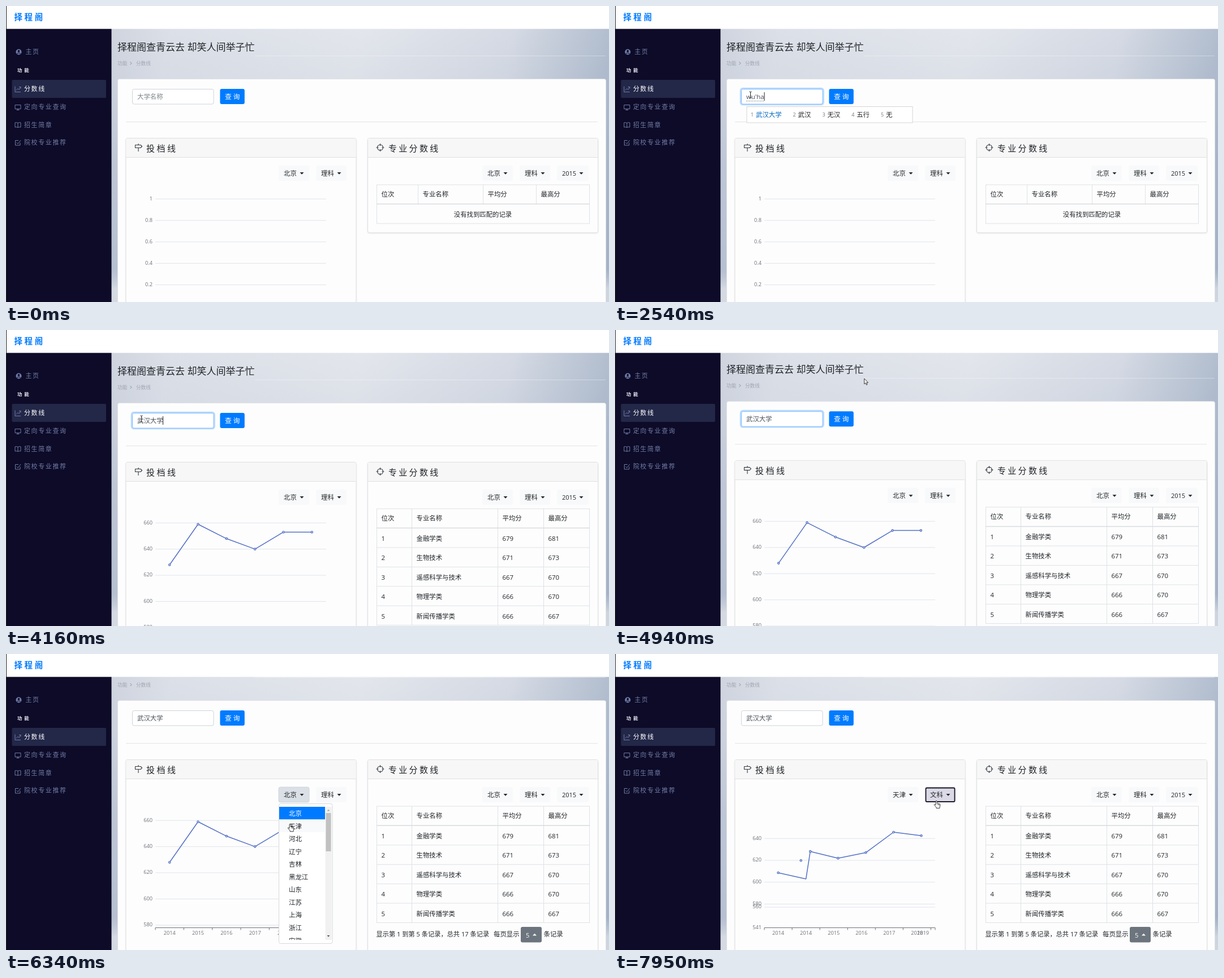
Recreate the animation shown at these times as an HTML page. Size 1066 by 525 pixels, loop 8000 ms.

```html
<!DOCTYPE html>
<html lang="zh-CN">
<head>
<meta charset="utf-8">
<title>分数线</title>
<style>
html, body { margin: 0; width: 100%; height: 100%; overflow: hidden; background: #fff; }
svg { display: block; width: 1066px; height: 525px; }
text { font-family: "Open Sans", "Noto Sans CJK SC", "Noto Sans CJK", sans-serif; white-space: pre; }
.soft { filter: drop-shadow(0 1px 1px rgba(0, 0, 0, .1)); }
.pop { filter: drop-shadow(0 1px 1.5px rgba(0, 0, 0, .24)); }
</style>
</head>
<body>
<svg viewBox="0 0 1066 525" xmlns="http://www.w3.org/2000/svg">
  <defs>
    <linearGradient id="sky" y2=".12">
      <stop offset="0" stop-color="#cfd4de"/>
      <stop offset=".12" stop-color="#dce0e8"/>
      <stop offset=".5" stop-color="#e3e6ec"/>
      <stop offset=".8" stop-color="#d5dae4"/>
      <stop offset="1" stop-color="#b0bccd"/>
    </linearGradient>
    <linearGradient id="haze" x2="0" y2="1">
      <stop offset="0" stop-color="#9dabc2" stop-opacity="0"/>
      <stop offset=".2" stop-color="#9dabc2" stop-opacity=".1"/>
      <stop offset=".5" stop-color="#9dabc2" stop-opacity=".42"/>
      <stop offset=".88" stop-color="#9dabc2" stop-opacity=".6"/>
      <stop offset=".95" stop-color="#d3d8e1" stop-opacity=".85"/>
      <stop offset="1" stop-color="#d3d8e1" stop-opacity=".9"/>
    </linearGradient>
    <clipPath id="listClip"><rect x="482" y="318" width="95" height="236"/></clipPath>
  </defs>
  <rect x="186" y="40" width="880" height="485" fill="url(#sky)"/>
  <rect x="186" y="40" width="880" height="485" fill="url(#haze)"/>
  <g id="page"></g>
  <g id="frame"></g>
  <g id="pointer"></g>
</svg>
<script>
const LOOP = 8000, TICK = 77.25, END = 47;
const BRAND = '择程阁';
const el = id => document.getElementById(id);
const lerp = (a, b, p) => a + (b - a) * p;
const clamp = v => Math.max(0, Math.min(1, v));
const cubic = u => u < .5 ? 4 * u ** 3 : 1 - (2 - 2 * u) ** 3 / 2;
const smooth = u => u * u * (3 - 2 * u);

// y is the vertical middle of the glyphs
const text = (x, y, s, size = 11.4, fill = '#212529', attr = '') =>
  `<text x="${x}" y="${(y + size * .37).toFixed(2)}" font-size="${size}" fill="${fill}" ${attr}>${s}</text>`;
const rect = (x, y, w, h, fill, attr = '') =>
  `<rect x="${x}" y="${y}" width="${w}" height="${h}" fill="${fill}" ${attr}/>`;
const line = (x1, y1, x2, y2, color, w = 1) =>
  `<path d="M${x1} ${y1}L${x2} ${y2}" stroke="${color}" stroke-width="${w}"/>`;
const icon = (x, y, d, color, w = 1) =>
  `<path transform="translate(${x} ${y})" d="${d}" fill="none" stroke="${color}" stroke-width="${w}" stroke-linejoin="round"/>`;
const spaced = n => `letter-spacing="${n}"`;

function chrome() {
  const dim = '#717ca9';
  const items = [
    ['分数线', 147, 'M0 -5V5H10M2 2L5 -1L7 1L10 -4M7 -4H10V-1'],
    ['定向专业查询', 179, 'M0 -4H10V3H0ZM5 3V5M2.5 5H7.5'],
    ['招生简章', 210.5, 'M5 -3.5V4.5M5 -3.5Q2.5 -5 0 -4V4Q2.5 3 5 4.5Q7.5 3 10 4V-4Q7.5 -5 5 -3.5'],
    ['院校专业推荐', 242, 'M9 0V4.5H.5V-4H6M2.5 -.5L5 2L10 -4.5']
  ];
  return rect(0, 40, 186.5, 485, '#0d0b27') + rect(0, 0, 1066, 40.6, '#fff') +
    rect(0, 0, 1, 525, '#222') +
    text(14.5, 20, BRAND, 14.5, '#007bff', 'font-weight="700" ' + spaced(3.6)) +
    `<circle cx="22.5" cy="81.5" r="5" fill="${dim}"/><circle cx="22.5" cy="80" r="1.9" fill="#0d0b27"/>` +
    icon(22.5, 81.5, 'M-3 3Q0 .5 3 3', '#0d0b27', 1.2) +
    text(34.5, 81, '主页', 11, dim, spaced(1.6)) +
    text(20, 113.5, '功能', 8.5, '#e8eaf4', 'font-weight="700" ' + spaced(3.8)) +
    rect(10.5, 131, 166.5, 32, '#232748', 'rx="2"') +
    items.map(([s, y, d], i) => icon(16, y + .5, d, dim) +
      text(32, y, s, 11, i ? dim : '#fff', (i ? '' : 'font-weight="500" ') + spaced(1.6))).join('');
}

function select(x, w, label, mode = '') {
  const fill = { hover: '#e6e9ef', open: '#dae0e5', focus: '#dad9e5' }[mode] || '#f8f9fa';
  const edge = mode === 'open' ? 'stroke="#d0d6dc"' : '';
  const cx = x + w - 13;
  return rect(x, 283, w, 27, fill, 'rx="3" ' + edge) +
    (mode === 'focus' ? rect(x + 1.5, 284.5, w - 3, 24.5, 'none', 'rx="2" stroke="#1c1b2c" stroke-width="1.8"') : '') +
    text(x + 9, 297, label, w > 55 ? 11 : 11.4) +
    `<path d="M${cx - 3.5} 295h7l-3.5 3.8z" fill="#212529"/>`;
}

function panel(x, h, title) {
  return rect(x + .5, 234.5, 407, h, '#fdfdfd', 'rx="3" stroke="#dfe0e2" class="soft"') +
    rect(x + 1, 235, 406, 33, '#f7f7f7', 'rx="2"') +
    line(x, 268.5, x + 407, 268.5, '#dfe0e2') + title;
}

function table(loaded) {
  const edge = '#dee2e6', cols = loaded ? [655, 717, 869, 950, 1031] : [655, 728, 843, 937, 1031];
  const rows = [['金融学类', 679, 681], ['生物技术', 671, 673], ['遥感科学与技术', 667, 670],
    ['物理学类', 666, 670], ['新闻传播学类', 666, 667]];
  const step = 34.4, n = loaded ? 5 : 1, bottom = 351.5 + step * n;
  let s = ['位次', '专业名称', '平均分', '最高分'].map((h, i) => text(cols[i] + 8.5, 334, h)).join('');
  cols.forEach((x, i) => {
    const inner = i % 4 !== 0;
    s += line(x + .5, 317, x + .5, loaded || !inner ? bottom : 351.5, edge);
  });
  s += line(655, 317, 1032, 317, edge) + line(655, 351.3, 1032, 351.3, '#d8dce0', 1.6);
  for (let i = 0; i < n; i++) {
    const y = 351.5 + step * (i + 1);
    s += line(655, y, 1032, y, edge);
    if (loaded) [i + 1, ...rows[i]].forEach((v, c) => s += text(cols[c] + 8.5, y - 16.2, v));
  }
  if (!loaded) return s + text(843, 370, '没有找到匹配的记录', 11.4, '#212529', 'text-anchor="middle"');
  return s + text(654.5, 544, '显示第 1 到第 5 条记录，总共 17 条记录', 11.2) + text(862, 544, '每页显示') +
    rect(910, 531, 37, 27.5, '#6c757d', 'rx="3"') + text(919, 545.5, '5', 11.2, '#fff') +
    '<path d="M931 546.5h7l-3.5 -3.8z" fill="#fff"/>' + text(950.5, 544, '条记录');
}

const years = [2014, 2015, 2016, 2017, 2018, 2019];
const EMPTY = { min: 0, max: 1, ticks: [0, .2, .4, .6, .8, 1], cats: [], vals: [] };
const BEIJING = { min: 578, max: 660, ticks: [580, 600, 620, 640, 660], cats: years, vals: [628, 659, 648, 640, 653, 653] };
const TIANJIN = { min: 562, max: 660, ticks: [562, 580, 600, 620, 640, 660], cats: years, vals: [612.6, 632, 626.5, 631.3, 649, 649] };
const ARTS = { min: 541, max: 640, ticks: [541, 560, 580, 600, 620, 640], cats: [2014, ...years], vals: [590, 603, 610, 600.5, 607, 630.5, 612] };
const yOf = (d, v) => 532.5 - (v - d.min) / (d.max - d.min) * 190.3;
const xOf = (d, i) => 264 + 302 / d.cats.length * (i + .5);

// keeps shared ticks and points moving, new ones appear in place
function chart(a, b, p) {
  let s = '';
  for (const v of b.ticks) {
    const y = a.ticks.includes(v) ? lerp(yOf(a, v), yOf(b, v), p) : yOf(b, v);
    if (v !== b.min) s += line(264, y, 566, y, '#e0e4ec');
    s += text(259, y - 1, v, 9.2, '#6e7079', 'text-anchor="end"');
  }
  const n = b.cats.length, old = a.cats.length, extra = n - old;
  if (!n) return s + line(264, 532.5, 566, 532.5, '#6e7079');
  let axis = 'M264 532.5H566';
  for (let i = 0; i <= n; i++) {
    const end = xOf(b, i - .5);
    axis += `M${i <= old ? lerp(xOf(a, i - .5), end, p) : end} 532.5v4`;
  }
  s += `<path d="${axis}" stroke="#6e7079" fill="none"/>`;
  b.cats.forEach((c, i) => {
    const x = i < old ? lerp(xOf(a, i), xOf(b, i), p) : xOf(b, i);
    s += text(x, 541.5, c, 9.2, '#6e7079', 'text-anchor="middle"');
  });
  const dots = [], pts = b.vals.map((v, i) => {
    const x = xOf(b, i), y = yOf(b, v), j = i ? i - extra : 0, fresh = extra && i === 1;
    const x0 = xOf(a, fresh ? i : j), y0 = yOf(a, fresh ? v : a.vals[j]);
    const pt = [lerp(x0, x, p), lerp(y0, y, p)];
    dots.push(fresh ? [x, y] : pt);
    return pt;
  });
  return s + `<polyline points="${pts.join(' ')}" fill="none" stroke="#5470c6" stroke-width="1.5" stroke-linejoin="bevel"/>` +
    dots.map(([x, y]) => `<circle cx="${x}" cy="${y}" r="1.6" fill="#fff" stroke="#5470c6" stroke-width="1.4"/>`).join('');
}

function chartAt(t, q) {
  if (t < 3860) return chart(EMPTY, EMPTY, 1);
  if (t < 6410) return chart(BEIJING, BEIJING, 1);
  if (t < 7790) return chart(BEIJING, TIANJIN, cubic(clamp((q - 6380) / 500)));
  return chart(TIANJIN, ARTS, cubic(clamp((q - 7775) / 500)));
}

const keys = [[1910, 'w'], [1990, 'wu'], [2390, "wu'h"], [2540, "wu'ha"], [2620, "wu'han"],
  [2700, "wu'han'd"], [2770, "wu'han'da"], [2850, "wu'han'da'x"], [3000, "wu'han'da'xue"]];

function searchBox(t) {
  const glow = t < 5560 ? clamp((t - 1120) / 150) : 0;
  let s = '';
  if (glow) s += rect(222, 146, 146.5, 29, 'none', `rx="4" stroke="#007bff" stroke-opacity="${.27 * glow}" stroke-width="2.6"`);
  s += rect(223.5, 147.5, 143.5, 26.5, '#fff', `rx="3" stroke="${glow > .5 ? '#80bdff' : '#ced4da'}"`);
  let caret = 233, on = t >= 1150;
  if (t < 1910) s += text(232, 161, '大学名称', 11.4, glow > .5 ? '#5b7be0' : '#7b838a');
  else if (t < 3080) {
    const typed = keys.filter(k => k[0] <= t).pop()[1];
    const w = [...typed].reduce((sum, c) => sum + (c === "'" ? 2.5 : c === 'w' ? 8.8 : 6.6), 0);
    s += text(232, 161, typed, 11.4, '#495057') +
      `<path d="M232 168.5h${w}" stroke="#495057" stroke-dasharray="1 1.5"/>`;
    caret = 233 + w;
  } else {
    s += text(232, 161, '武汉大学', 11.4, '#495057');
    caret = 277.5;
    on = t < 3630 || (t >= 4160 && t < 4690);
  }
  if (on) s += line(caret, 153, caret, 168, '#222', 1);
  return s;
}

function suggestions(t) {
  if (t >= 1300 && t < 1910)
    return rect(223, 173, 144.5, 63, '#fff', 'rx="3" class="pop"') + line(224, 173.5, 367, 173.5, '#e6e8ea') +
      text(232, 191, '武汉大学', 9.2) + text(232, 216.5, '中国石油大学（北京）', 9.2);
  if (t < 1910 || t >= 3080) return '';
  const wide = t >= 2540;
  const words = wide ? ['武汉大学', '武汉', '无汉', '五行', '无'] : t < 2390 ? ['我', '无', '五', '为', '问'] : ['武汉', '无', '五', '吴'];
  let x = 240, s = rect(233, 178.5, wide ? 293 : 203, 28.5, '#fff', 'stroke="#d5d5d5"');
  words.forEach((w, i) => {
    s += text(x, 193, i + 1, 9, '#777') + text(x + 9, 193, w, 11.4, i ? '#222' : '#0067c0');
    x += 29 + w.length * 11.4;
  });
  return s;
}

function menus(t) {
  if (t >= 5640 && t < 6410) {
    const names = '北京 天津 河北 辽宁 吉林 黑龙江 山东 江苏 上海 浙江 安徽'.split(' ');
    const hover = t >= 6170;
    return rect(482.5, 312.5, 94.5, 248, '#fff', 'rx="3" stroke="#d6d8da"') +
      `<g clip-path="url(#listClip)">` + rect(483, 318, 81, 22.5, '#007bff') +
      (hover ? rect(483, 340.5, 81, 22.5, '#f8f9fa') : '') +
      names.map((n, i) => text(500, 329.8 + 22.55 * i, n, 11.4, i ? '#212529' : '#fff')).join('') + '</g>' +
      rect(564.5, 318, 11, 236, '#f1f1f1') + rect(565.5, 329, 9, 68, '#c1c1c1') +
      '<path d="M567.5 325.5h5l-2.5 -2.8z" fill="#a3a3a3"/><path d="M567.5 546h5l-2.5 2.8z" fill="#505050"/>';
  }
  if (t >= 7190 && t < 7790) {
    const over = t >= 7480;
    return rect(548.5, 312.5, 56, 51, '#fff', 'rx="3" stroke="#d6d8da"') + rect(549, 316, 55, 22.5, '#007bff') +
      (over ? rect(549, 338.5, 55, 22.5, '#f8f9fa') : '') +
      text(566, 327.5, '理科', 11.4, '#fff') + text(566, 350, '文科');
  }
  return '';
}

function selects(t) {
  let left = '', right = '';
  if (t >= 5640 && t < 6410) left = 'open';
  else if (t >= 6410 && t < 7110) left = 'focus';
  else if (t >= 5400 && t < 5640) left = 'hover';
  if (t >= 7790) right = 'focus';
  else if (t >= 7190) right = 'open';
  else if (t >= 6800) right = 'hover';
  return select(482, 54, t < 6410 ? '北京' : '天津', left) + select(548, 54, t < 7790 ? '理科' : '文科', right) +
    select(842, 54, '北京') + select(908, 54, '理科') + select(974, 56, '2015');
}

function content(t, q) {
  const loaded = t >= 3860, ink = '#343a40';
  const sign = icon(227, 244, 'M1.5 2.5H11L13.5 5L11 7.5H1.5ZM7 0V2.5M7 7.5V14', ink, 1.1) +
    text(248, 252, '投档线', 15, '#212529', spaced(3.5));
  const aim = icon(661.5, 251, 'M-5 0A5 5 0 1 1 5 0A5 5 0 1 1 -5 0M0 -7V-3M0 3V7M-7 0H-3M3 0H7', ink, 1.1) +
    text(676, 252, '专业分数线', 15, '#212529', spaced(3.3));
  return text(197, 73, BRAND + '查青云去 却笑人间举子忙', 17) +
    line(440, 88.5, 1060, 88.5, 'rgba(255,255,255,.35)') +
    text(197, 101.5, '功能', 8.8, '#a0a6b0') + icon(220.5, 101.5, 'M-1 -2.5L1.5 0L-1 2.5', '#858c98') +
    text(230, 101.5, '分数线', 8.6, '#a0a6b0') +
    rect(197.5, 129.5, 863, 600, '#fdfdfd', 'rx="3" stroke="#dfe2e7"') +
    rect(378.4, 147, 43.4, 27, '#007bff', 'rx="3"') +
    text(387, 161, '查询', 11.7, '#fff', 'font-weight="500" ' + spaced(3)) +
    line(212, 205.5, 1046, 205.5, '#e4e5e7') +
    panel(211.5, 400, sign) + panel(639, loaded ? 400 : 167.5, aim) +
    selects(t) + table(loaded) + chartAt(t, q) + searchBox(t) + suggestions(t) + menus(t);
}

const path = [[70, 1044, 499], [220, 930, 440], [450, 590, 270], [620, 380, 175], [750, 290, 142], [830, 265, 156],
  [900, 235, 157], [980, 239.5, 157.5], [4480, 239.5, 157.5], [4640, 300, 128], [4790, 390, 97], [4940, 441, 86],
  [5100, 468, 130], [5330, 500, 225], [5420, 506, 246], [5720, 506, 246], [6180, 504, 292], [6340, 502, 302],
  [6420, 503, 302], [6640, 545, 270], [6870, 573, 252], [7110, 573, 250], [7250, 572, 252], [7600, 570, 294],
  [7780, 570, 294], [7950, 568, 260], [8000, 568, 258]];

function cursor(t, q) {
  if (t < 70) return '';
  const i = Math.max(1, path.findIndex(k => k[0] >= q));
  const [t0, x0, y0] = path[i - 1], [t1, x1, y1] = path[i];
  const u = clamp((q - t0) / (t1 - t0)), x = lerp(x0, x1, u), y = lerp(y0, y1, u);
  const shape = (d, w, fill) => `<path transform="translate(${x} ${y})" d="${d}" fill="${fill}" stroke="#222" stroke-width="${w}" stroke-linejoin="round"/>`;
  if (t < 4700 && x > 223 && x < 367 && y > 147 && y < 174)
    return shape('M-2 -5.5Q0 -5.5 0 -4.5Q0 -5.5 2 -5.5M0 -4.5V4.5M-2 5.5Q0 5.5 0 4.5Q0 5.5 2 5.5', 1, 'none');
  if (t >= 5380)
    return shape('M-1 1Q0 -.5 1.2 1V5L6 6Q7 6.3 7 7.5L6 12V13.5H0V12L-3.8 7.5Q-3.5 6 -2.2 6.8L-1 8ZM3 6V8M5 6.5V8.5', .9, '#fff');
  return shape('M0 0V9.8L2.2 7.8L3.8 11.3L5.4 10.6L3.9 7.2H6.8Z', .9, '#fff');
}

function draw(now) {
  const t = now % LOOP;
  const q = Math.floor((t + 25) / TICK) * TICK - 5;
  const scroll = END * smooth(clamp((q - 4870) / 460));
  el('page').setAttribute('transform', `translate(0 ${-scroll})`);
  el('page').innerHTML = content(t, q);
  el('pointer').innerHTML = cursor(t, q);
}

el('frame').innerHTML = chrome();
const start = performance.now();
function loop() {
  draw(performance.now() - start);
  requestAnimationFrame(loop);
}
loop();
</script>
</body>
</html>
```
